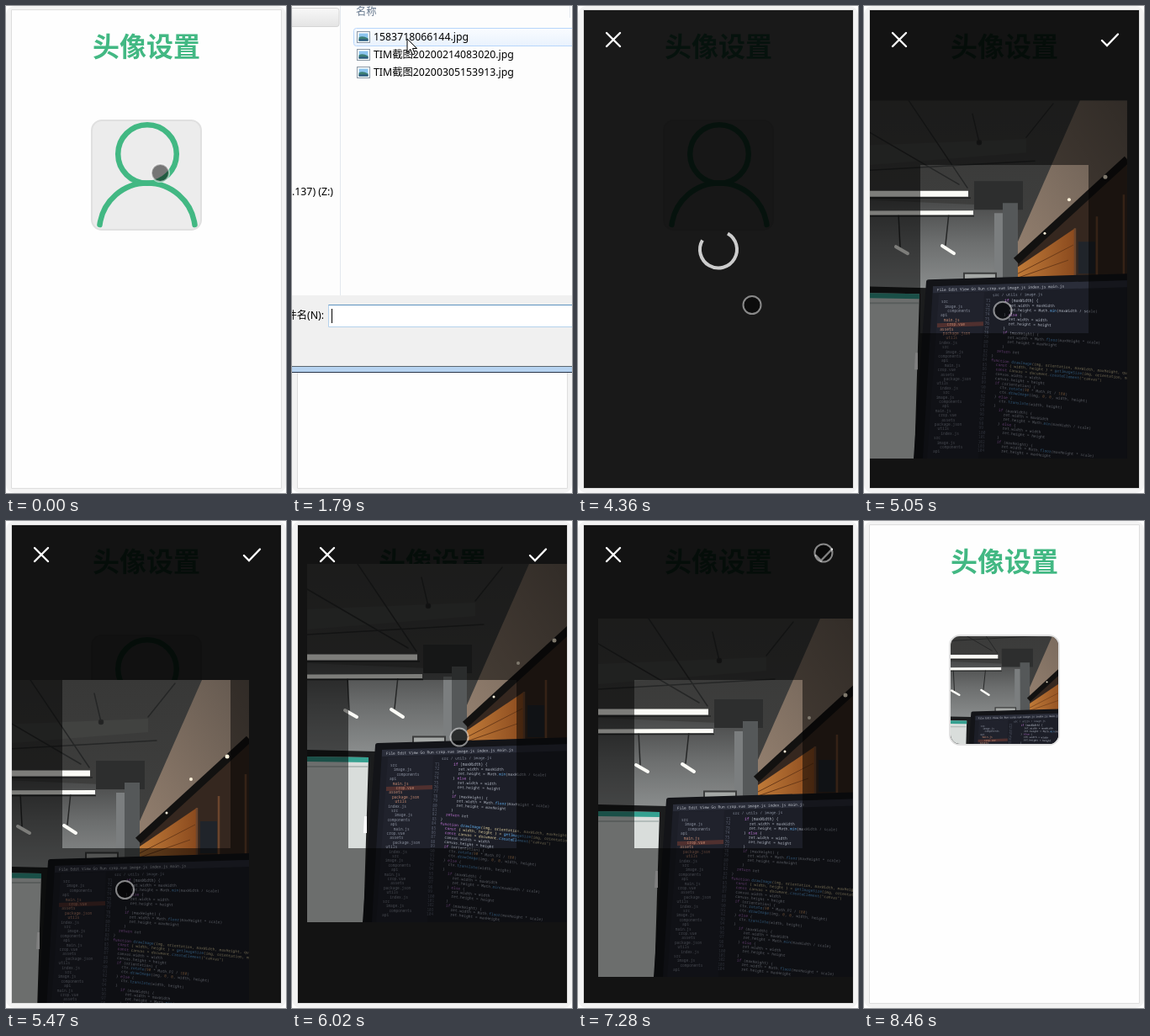
Write an HTML page that moves like this. It is 333 px wide and 579 px high and loops after 9.14 s.

```html
<!DOCTYPE html>
<html lang="zh">
<head>
<meta charset="utf-8">
<title>头像设置</title>
<style>
  html, body { margin: 0; width: 100%; height: 100%; overflow: hidden; background: #fff; }
  svg { display: block; }
  text { font-family: "Noto Sans", "Noto Sans CJK SC", "Noto Sans CJK", sans-serif; font-size: 12.3px; }
  .title { font: bold 32px "Noto Sans CJK SC", "Noto Sans CJK", sans-serif; fill: #42b883; }
  .tiny text { font: 4.5px "Noto Sans Mono", monospace; }
  .line { fill: none; stroke-linecap: round; }
</style>
</head>
<body>
<svg width="333" height="579" viewBox="0 0 333 579">
  <defs>
    <linearGradient id="ceiling" x2="0" y2="1">
      <stop stop-color="#383837"/><stop offset="1" stop-color="#4a4b4a"/>
    </linearGradient>
    <linearGradient id="wall" x2="0" y2="1">
      <stop stop-color="#484949"/><stop offset=".45" stop-color="#6c6e6e"/><stop offset="1" stop-color="#8d9090"/>
    </linearGradient>
    <linearGradient id="beige" x1="1" x2="0" y2="1">
      <stop stop-color="#62574e"/><stop offset="1" stop-color="#94806f"/>
    </linearGradient>
    <linearGradient id="orange" x2="1">
      <stop stop-color="#c07a38"/><stop offset="1" stop-color="#8a4a1e"/>
    </linearGradient>
    <linearGradient id="hover" x2="0" y2="1">
      <stop stop-color="#fafcff"/><stop offset="1" stop-color="#e9f2fd"/>
    </linearGradient>
    <linearGradient id="grey" x2="0" y2="1">
      <stop stop-color="#f8f8f8"/><stop offset="1" stop-color="#e4e4e4"/>
    </linearGradient>
    <clipPath id="panel"><path d="M7 5H327V573H7z"/></clipPath>
    <clipPath id="round"><rect x="103" y="137" width="128" height="128" rx="11"/></clipPath>
    <clipPath id="edge"><path d="M0 0H320V426H0z"/></clipPath>

    <g id="icon">
      <rect width="15" height="13" fill="#fff" stroke="#8b98a5"/>
      <path d="M2 2H13V11H2z" fill="#8cc4ee"/>
      <path d="M2 7Q6 4 13 8V11H2z" fill="#3d7f74"/>
      <path d="M2 9H13V11H2z" fill="#2a567f"/>
    </g>

    <g id="photo" clip-path="url(#edge)">
      <path d="M0 0H320V426H0z" fill="url(#ceiling)"/>
      <path d="M0 118L190 126V230H0z" fill="url(#wall)"/>
      <path d="M0 54L200 46V62L0 78z" fill="#414240"/>
      <path d="M138 96H196V130H138z" fill="#2d2e2e"/>
      <path d="M172 122H190V214H172z" fill="#555859"/>
      <path d="M162 134H172V210H162z" fill="#7b7e7f"/>
      <g class="line" stroke="#252626" stroke-width="1.5">
        <path d="M0 84L210 72M60 0L130 104M232 4L200 44M0 30L120 100M136 16L144 50M108 134L104 172M48 134L50 174"/>
        <circle cx="144" cy="50" r="2.5" fill="#222"/>
      </g>
      <g class="line" stroke="#fbfbf6">
        <path d="M0 111L131 111" stroke-width="7" stroke-linecap="butt"/>
        <path d="M0 134L137 133.5" stroke-width="5" stroke-linecap="butt"/>
        <path d="M45 174L59 182M100 173L114 182" stroke-width="4"/>
      </g>
      <path d="M0 116H134M0 137.500H138" stroke="#232424" stroke-width="1.500"/>
      <path d="M264 0H320V78L190 200V168z" fill="url(#beige)"/>
      <path d="M190 190L320 72V215H190z" fill="#35271f"/>
      <path d="M190 198L258 152V212H190z" fill="url(#orange)"/>
      <path d="M190 206L256 172M190 211L250 190" stroke="#6b3a18"/>
      <path d="M258 152V210M284 138V210M316 112V210" stroke="#6b452d" stroke-width="2.500"/>
      <path d="M262 168H282V206H262z" fill="#20242a"/>
      <path d="M188 191L320 70" stroke="#121110" stroke-width="9"/>
      <g fill="#fff3dc"><circle cx="294" cy="91" r="2.500"/><circle cx="251" cy="118" r="2"/><circle cx="222" cy="158" r="1.500"/></g>
      <path d="M126 213V205.500H164V213" fill="#a5a8a6" stroke="#3b3c3c" stroke-width="2"/>

      <path d="M0 221L82 223V426H0z" fill="#1b1c1d"/>
      <path d="M0 229L73 230L67 426H0z" fill="#d9dddb"/>
      <path d="M0 229L73 230V236L0 235z" fill="#35a090"/>
      <path d="M0 241H72" stroke="#b3bcba" stroke-width="2"/>
      <path d="M68 300L71 300V320L67 320z" fill="#fff"/>
      <path d="M81 216Q81 213 84 213L320 206V426H66z" fill="#131418"/>
      <path d="M89 221L320 214V426H77z" fill="#1c1e27"/>
      <path d="M89 221L320 214V222L89 229z" fill="#2a2d39"/>
      <path d="M96 230L150 228L143 426H82z" fill="#20222c"/>
      <path d="M94 265L149 263V268L94 270z" fill="#50302f"/>
      <g id="code" class="tiny"></g>
    </g>
  </defs>

  <rect width="333" height="579" rx="10" fill="#f3f3f3"/>
  <path d="M6.500 4.500H327.500V573.500H6.500z" fill="#fefefe" stroke="#dedede"/>
  <text class="title" x="167" y="60" text-anchor="middle">头像设置</text>
  <rect x="102" y="136" width="130" height="130" rx="12" fill="#ececec" stroke="#e0e0e0" stroke-width="2"/>
  <g id="blank" class="line" stroke="#42b883" stroke-width="6.500">
    <circle cx="168" cy="176" r="34.800"/>
    <path d="M111.500 260A57 57 0 0 1 224.500 260"/>
  </g>
  <g id="avatar" clip-path="url(#round)">
    <use href="#photo" transform="translate(103 137) scale(.64) translate(-43 -73)"/>
  </g>

  <g id="cropper">
    <path id="veil" d="M7 5H327V573H7z"/>
    <g id="editor" clip-path="url(#panel)">
      <use id="picture" href="#photo"/>
      <path d="M7 5H327V573H7zM67 189V389H267V189z" fill-rule="evenodd" fill-opacity=".5"/>
      <path class="line" d="M283 41L289 47L302 33.500" stroke="#fff" stroke-width="2.400"/>
    </g>
    <path class="line" d="M34 32L50 48M50 32L34 48" stroke="#fff" stroke-width="2.400"/>
    <path id="spinner" class="line" d="M15.560 -15.560A22 22 0 1 1 -15.560 -15.560" stroke="#ccc" stroke-width="4" style="stroke-linecap:butt"/>
  </g>

  <g id="dialog">
    <path d="M0 0H333V345H0z" fill="#fdfdfd"/>
    <rect x="-10" y="2.500" width="66" height="22" rx="3" fill="url(#grey)" stroke="#d5d5d5"/>
    <path d="M57.500 0V344" stroke="#e3e8ee"/>
    <path d="M330.500 0V14" stroke="#e3e8ee"/>
    <text x="76" y="11" fill="#66788e">名称</text>
    <text x="49" y="225" text-anchor="end">.137) (Z:)</text>
    <rect id="row" x="73.500" y="26.500" width="270" height="21" rx="3" fill="url(#hover)" stroke="#b8d6fb"/>
    <g id="files"></g>
    <path d="M0 344H333V429H0z" fill="#f0f0f0"/>
    <text x="38" y="372" text-anchor="end">文件名(N):</text>
    <path d="M340 355.500H43.500V381.500H340" fill="#fff" stroke="#b5d2ec"/>
    <path d="M340 355.500H43.500" stroke="#5d92bf"/>
    <path id="caret" d="M47.500 360V377" stroke="#000"/>
    <path d="M0 428H333V436H0z" fill="#b7d3f0"/>
    <path d="M0 428.500H333" stroke="#5c6670"/>
    <path d="M0 435.500H333" stroke="#26344a"/>
  </g>

  <circle id="dot" r="10.500" fill="#000" fill-opacity=".5" stroke="#fff" stroke-opacity=".5" stroke-width="2"/>
  <path id="arrow" d="M0 0V16L3.800 12.500L6.500 19L9.200 17.800L6.500 11.500H11.500z" fill="#fff" stroke="#000"/>
</svg>
<script>
const LOOP = 9140;
const $ = id => document.getElementById(id);
const show = (id, on) => { $(id).style.display = on ? '' : 'none'; };
const move = (id, [x, y], extra = '') => $(id).setAttribute('transform', `translate(${x} ${y})${extra}`);

const bursts = [[130, 270, 2], [610, 1520, 8], [1670, 1790, 2], [2070, 3000, 8], [3150, 3900, 6],
  [4210, 5200, 8], [5350, 6320, 8], [6470, 7280, 7], [7560, 8460, 7]];

// Paths as [time, x, y]
const pointerPath = [[0, 183.5, 198.5], [270, 184, 193], [870, 184, 193], [1520, 160, 98], [1670, 143, 56],
  [1790, 137, 39], [2200, 137, 39], [3000, 264, 386], [3300, 266, 389], [3900, 207, 355.5], [4493, 207, 355.5],
  [4775, 179, 326], [5058, 165, 362], [5350, 142, 438], [5489, 141.5, 438.5], [5766, 180, 320],
  [5904, 195, 268], [6043, 199, 257], [6320, 205, 306], [6605, 205, 322], [6740, 205, 322],
  [7010, 262, 120], [7145, 288, 48], [7280, 292, 38], [7600, 292, 38], [8310, 297, 565]];
const photoPath = [[4493, 7, 76], [4775, 7, 76], [5058, -7, 112], [5350, -30, 188], [5489, -31, 189],
  [5766, 4, 97], [5904, 16, 58], [6043, 18, 51], [6320, 24, 100], [6605, 24, 116]];

function snap(t) {
  let q = 0;
  for (const [a, b, n] of bursts) {
    const d = (b - a) / (n - 1);
    if (t >= a) q = a + d * Math.min(n - 1, Math.floor((t - a + 25) / d));
  }
  return q;
}

function along(path, t) {
  const i = path.findIndex(p => p[0] > t);
  if (i === 0) return path[0].slice(1);
  if (i < 0) return path[path.length - 1].slice(1);
  const [a, b] = [path[i - 1], path[i]];
  const k = (t - a[0]) / (b[0] - a[0]);
  return [1, 2].map(c => a[c] + (b[c] - a[c]) * k);
}

function buildFiles() {
  const names = ['1583718066144.jpg', 'TIM截图20200214083020.jpg', 'TIM截图20200305153913.jpg'];
  $('files').innerHTML = names.map((name, i) =>
    `<use href="#icon" x="77.5" y="${30.5 + 21 * i}"/><text x="97" y="${41 + 21 * i}">${name}</text>`).join('');
}

function buildCode() {
  const lines = [
    [2, 'if (maxWidth) {'], [3, 'ret.width = maxWidth'], [3, 'ret.height = Math.min(maxWidth / scale)'],
    [2, '} else {'], [3, 'ret.width = width'], [3, 'ret.height = height'], [2, '}'],
    [2, 'if (maxHeight) {'], [3, 'ret.width = Math.floor(maxHeight * scale)'], [3, 'ret.height = maxHeight'], [2, '}'],
    [1, 'return ret'], [0, '}'],
    [0, 'function drawImage(img, orientation, maxWidth, maxHeight, quality) {'],
    [1, 'const { width, height } = getImageSize(img, orientation, maxWidth)'],
    [1, 'const canvas = document.createElement("canvas")'], [1, 'canvas.width = width'], [1, 'canvas.height = height'],
    [1, 'if (orientation) {'], [2, 'ctx.rotate(90 * Math.PI / 180)'], [2, 'ctx.drawImage(img, 0, 0, width, height)'],
    [1, '} else {'], [2, 'ctx.translate(width, height)'], [1, '}']];
  const paint = s => s.replace(/\b(if|else|return|const|function)\b|(\w+(?=\())|(\d+)/g, (m, word, call) =>
    `<tspan fill="${word ? '#c678dd' : call ? '#61afef' : '#d19a66'}">${m}</tspan>`);
  const text = (x, y, fill, s, turn = 0) =>
    `<text transform="translate(${x} ${y}) rotate(${turn})" fill="${fill}">${s}</text>`;
  const tree = ['src', 'api', 'assets', 'index.js', 'components', 'crop.vue', 'utils', 'image.js', 'main.js', 'package.json'];
  let out = text(94, 227, '#c3c7cf', 'File Edit View Go Run  crop.vue   image.js   index.js   main.js', -1.7)
    + text(160, 233, '#8f96a5', 'src / utils / image.js', -1);
  for (let i = 0; i < 34; i++) {
    const y = 240 + 5.4 * i, lean = Math.min(6, i * .42), shift = i * .3;
    const [tab, s] = lines[i % lines.length];
    out += text(152 - shift, y, '#5a6070', 71 + i);
    out += text(162 - shift + tab * 6, y, i > 12 && i < 16 ? '#e3d3a2' : '#b4bac6', paint(s), lean);
    out += text(99 - shift + i % 3 * 4, y + 1, i > 3 && i < 9 ? '#c58a72' : '#878d9b', tree[i * 7 % 10]);
  }
  $('code').innerHTML = out;
}

function render(t) {
  const q = snap(t);
  const inDialog = q >= 610 && q < 2200;
  const open = q >= 2300 && q < 7700;
  const editing = open && q > 4480;
  const spot = along(pointerPath, q);

  show('dialog', inDialog);
  $('dialog').style.opacity = q < 700 ? .6 : 1;
  const row = Math.floor((spot[1] - 26) / 21);
  show('row', row >= 0 && row < 3);
  $('row').setAttribute('y', 26.5 + 21 * row);
  show('caret', Math.floor((q - 710) / 530) % 2 === 0);

  show('blank', q < 7700);
  show('avatar', q >= 7700);
  show('cropper', open);
  $('cropper').style.opacity = q < 2400 ? .5 : 1;
  $('veil').setAttribute('fill-opacity', editing ? .85 : .9);
  show('editor', editing);
  show('spinner', !editing);
  move('picture', along(photoPath, q));
  move('spinner', [167, 289.5], ` rotate(${(q - 4351) * .36 - 15})`);

  show('arrow', inDialog);
  show('dot', !inDialog && q < 8450);
  move('arrow', spot);
  move('dot', spot);
}

buildFiles();
buildCode();
const start = performance.now();
(function frame() {
  render((performance.now() - start) % LOOP);
  requestAnimationFrame(frame);
})();
</script>
</body>
</html>
```
